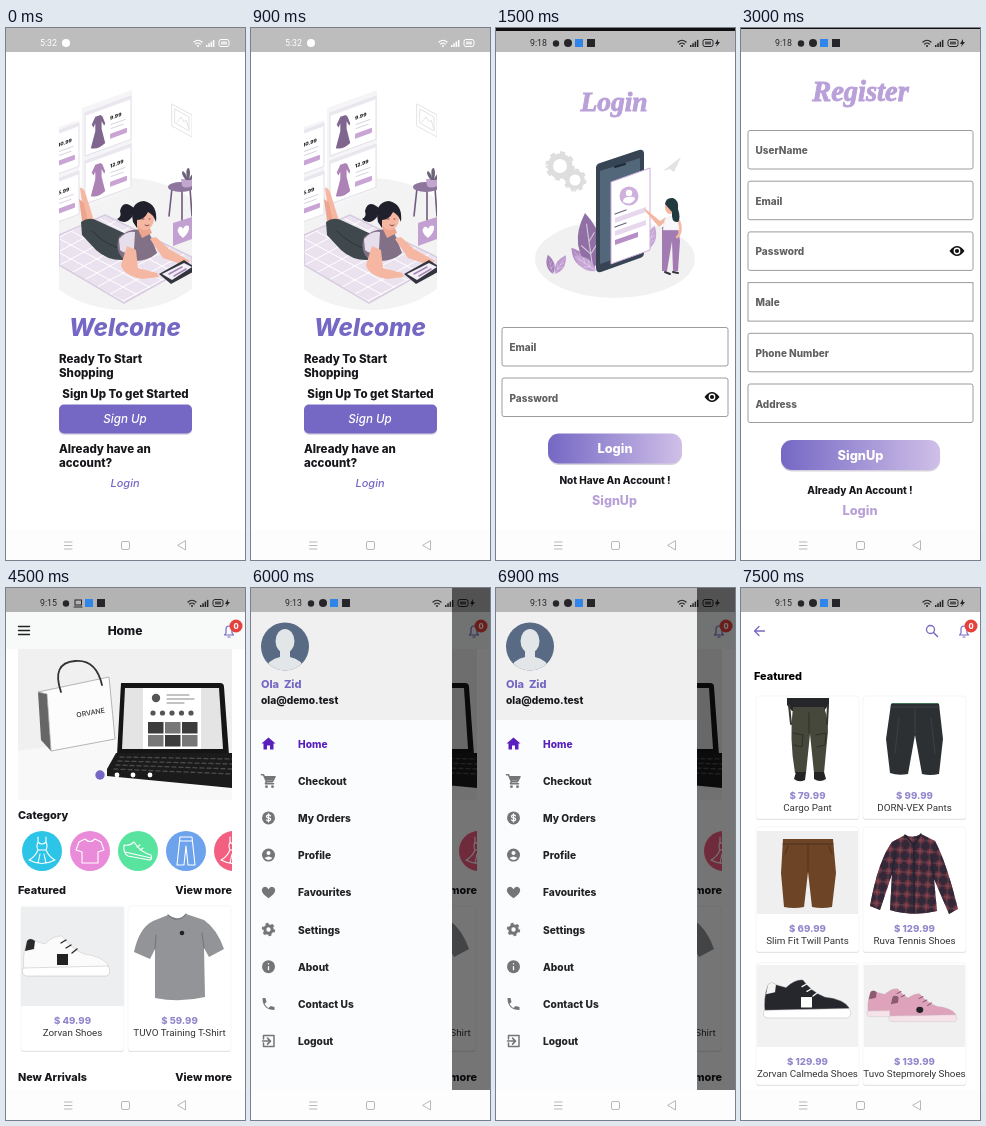
Animation of 239 by 532 pixels, one loop 8 s. Source, as an HTML page:

```html
<!DOCTYPE html>
<html lang="en">
<head>
<meta charset="utf-8">
<title>Shop app tour</title>
<style>
html, body { margin: 0; width: 100%; height: 100%; overflow: hidden; background: #fff; }
svg { display: block; width: 100%; height: 100%; }
text { font-family: Inter, sans-serif; font-weight: 800; white-space: pre; }
.plain { font-family: Roboto, sans-serif; font-weight: 400; }
.script { font-family: "Liberation Serif", serif; font-weight: 700; font-style: italic; stroke: #b9a0d8; stroke-width: .9; }
.italic { font-style: italic; }
.medium { font-weight: 500; }
</style>
</head>
<body>
<svg id="stage" viewBox="0 0 239 532" preserveAspectRatio="none"></svg>
<script>
const PURPLE = '#7568c4', LILAC = '#b9a0d8', INK = '#17171c', GREY = '#757575', SKIN = '#f6b7a2';
const HOLD = 1500, LOOP = 8000;

// Drawing helpers
const rect = (x, y, w, h, fill, extra = '') => `<rect x="${x}" y="${y}" width="${w}" height="${h}" fill="${fill}" ${extra}/>`;
const disc = (x, y, r, fill, extra = '') => `<circle cx="${x}" cy="${y}" r="${r}" fill="${fill}" ${extra}/>`;
const oval = (x, y, rx, ry, fill) => `<ellipse cx="${x}" cy="${y}" rx="${rx}" ry="${ry}" fill="${fill}"/>`;
const path = (d, fill, extra = '') => `<path d="${d}" fill="${fill}" ${extra}/>`;
const line = (d, color, width = 1, extra = '') =>
  `<path d="${d}" fill="none" stroke="${color}" stroke-width="${width}" stroke-linecap="round" stroke-linejoin="round" ${extra}/>`;
const group = (transform, body) => `<g transform="${transform}">${body}</g>`;
const text = (x, y, size, str, fill = INK, cls = '', anchor = 'start') =>
  `<text x="${x}" y="${y}" font-size="${size}" fill="${fill}" class="${cls}" text-anchor="${anchor}">${str}</text>`;
const centered = (x, y, size, str, fill, cls) => text(x, y, size, str, fill, cls, 'middle');

const icons = {
  dress: 'M-4-14V-9Q-6-5-4-1Q-7 6-13 9Q0 16 13 9Q7 6 4-1Q6-5 4-9V-14M-4-9Q0-5 4-9M-4-1H4M-2 3L-4 12M2 3L4 12',
  tee: 'M-5-12L-11-9L-14-1L-8 1V12H8V1L14-1L11-9L5-12Q0-7-5-12Z',
  shoe: 'M-14-6Q-8-5-4-9Q2 1 13 4Q15 9 11 9L-10 5Q-15 2-14-6ZM-13 1L13 7M-1-4L2-6M2-1L5-3',
  pants: 'M-6-14H6L9 14H2L0-5L-2 14H-9ZM-6-10H6'
};

// Phone chrome
function statusBar(clock, { shade = '#bdbdbd', color = '#26262a', strip = 0, first = false, screen = false } = {}) {
  let s = rect(0, 0, 239, 24, shade) + rect(0, 0, 239, strip, '#111');
  s += text(34, 18, 8.8, clock, color, 'plain');
  if (first) s += disc(60, 15, 4, color);
  else s += disc(60, 15.5, 3.2, color)
    + (screen ? rect(69, 12, 6.5, 5, 'none', `stroke="${color}"`) + line('M68 19H76', color) : disc(72, 15, 4, color))
    + rect(79, 11, 8, 8, '#2f86e8') + rect(91, 11, 8, 8, color);
  s += group(`translate(${first ? 6 : 0} 0)`,
    line('M182 14Q186 10.5 190 14M183.7 16Q186 14 188.3 16', color, 1.2) + disc(186, 18, 1, color)
    + [0, 1, 2, 3].map(i => rect(194 + i * 2.3, 17 - i * 1.7, 1.5, 2 + i * 1.7, color)).join('')
    + rect(207, 11.5, 10, 7, 'none', `rx="2" stroke="${color}"`) + rect(209, 13.5, 6, 3, color, 'opacity=".7"')
    + (first ? '' : path('M222 11L219 16H221L220 19L224 14H222Z', color)));
  return s;
}
const navBar = () => rect(0, 502, 239, 30, '#fdfdfd')
  + line('M58.5 514H66M58.5 517.5H66M58.5 521H66', '#b8b8b8')
  + rect(115.5, 513.5, 8, 8, 'none', 'rx="1.5" stroke="#b8b8b8"')
  + line('M179.5 513V522L172 517.5Z', '#b8b8b8');
const bell = () => line('M218.5 47H227.5L226 45V41.5Q226 38 223 38Q220 38 220 41.5V45ZM222 49H224', PURPLE, 1.2)
  + disc(230, 38, 6.5, '#e5423d') + centered(230, 41, 7.5, '0', '#fff');

// Welcome screen
function priceCard(x, y, price, color) {
  return group(`translate(${x} ${y}) skewY(-20)`,
    rect(0, 0, 46, 43, '#fff', 'stroke="#e4dfe8"') + rect(0, 0, 46, 3, '#ebe7ee')
    + group('translate(13 23) scale(.9 1.1)', path('M-3-14L-7-8L-5-5L-3-8L-3-1L-8 13Q0 17 8 13L4-1V-8L7-3L8-5L5-12L3-14Z', color))
    + text(25, 16, 5, price, INK) + line('M26 21H40M26 25H38', '#d8d2dd') + rect(25, 30, 17, 5, '#c9a5d6', 'rx="1"'));
}
function welcome() {
  const rug = 'M53 207L99 187L186 229V237L118 275L53 237Z';
  const art = oval(119, 216, 91, 66, '#f3f3f3')
    + path('M76 80L126 62V161L76 184Z', '#f5f4f6') + path('M53 99L73 92V171L53 184Z', '#f5f4f6')
    + priceCard(79, 85, '9.99', '#80658f') + priceCard(79, 133, '12.99', '#ad83b7')
    + priceCard(27, 112, '10.99', '#9f78ab') + priceCard(27, 160, '5.99', '#80658f')
    + line('M166 76L186 87V109L166 98ZM169 81L183 89V103L169 95ZM171 94L175 89L178 94L180 92L183 101', '#e4e4e4')
    + path(rug, '#eae3ef') + path(rug, 'url(#lattice)') + line(rug, '#d8cce0', 1.5)
    + line('M166 160L163 188M176 162V198M184 160L186 188', '#6f5b7e', 1.6) + oval(175, 159, 13, 5, '#8d759d')
    + path('M175 151H186V158Q180 161 176 158Z', '#c3a6cf')
    + path('M180 152Q174 145 177 143Q180 145 181 150Q179 140 183 140Q185 145 183 151Q187 143 189 147L185 152Z', '#6d6479')
    + path('M167 195L186 189V211L167 218Z', '#c3a0d2')
    + path('M177 210Q169 204 173 199Q176 198 177 201Q179 196 183 198Q184 204 177 210Z', '#fff')
    // Reader on the rug
    + path('M74 160Q78 159 80 167L89 196L82 204Q75 187 76 174Z', SKIN) + path('M73 171L78 175L84 202L77 200Z', '#eda58f')
    + path('M75 194Q83 188 92 193L120 206L118 232Q102 233 90 222L76 207Z', '#3f484c')
    + line('M86 203Q101 218 116 221', '#2d3437')
    + path('M113 209Q126 197 143 204L151 225Q139 236 119 232Q108 224 113 209Z', '#817086')
    + path('M113 211Q121 202 129 204L128 221Q120 228 114 222Z', '#e6dfeb')
    + path('M121 218L115 237Q117 247 136 251L153 249L151 245L132 240L130 222Z', SKIN)
    + path('M144 211L157 230L178 237L184 233L163 221L150 209Z', SKIN)
    + group('translate(3 -3)',
      path('M127 200L140 201L143 208L133 213Z', '#eda58f') + oval(136, 194, 9, 11, SKIN)
      + path('M124 197Q120 177 135 176Q149 179 147 197Q144 189 139 187Q135 195 128 195L128 203Z', '#1f202b')
      + path('M126 184Q114 173 111 186Q113 192 108 194Q116 201 123 192Z', '#1f202b')
      + line('M133 194H135M140 194H141M136 200Q138 202 140 200', '#5c3038', .8))
    + path('M153 246L178 232L187 238V244L165 256Z', '#34343f') + path('M156 246L178 235L186 239L166 252Z', '#f3eff6')
    + line('M163 246L176 239M168 248L180 241', '#a986b9', 1.5);
  return statusBar('5:32', { color: '#fff', first: true })
    + `<g clip-path="url(#artClip)">${art}</g>`
    + centered(119, 308, 24.2, 'Welcome', PURPLE, 'italic')
    + text(53, 335, 11.5, 'Ready To Start') + text(53, 349, 11.5, 'Shopping')
    + centered(119.5, 370, 11.5, 'Sign Up To get Started')
    + rect(53, 378, 133, 29, '#dddae8', 'rx="5"') + rect(53, 376.5, 133, 29, PURPLE, 'rx="5"')
    + centered(119, 395, 11.6, 'Sign Up', '#fff', 'italic medium')
    + text(53, 425, 11.5, 'Already have an') + text(53, 439, 11.5, 'account?')
    + centered(119, 459, 11, 'Login', PURPLE, 'italic medium');
}

// Forms
const field = (x, y, label, radius = 2) => rect(x, y, 232 - x, 38.5, '#fff', `rx="${radius}" stroke="#9c9c9c"`)
  + text(x + 7.5, y + 23.5, 10, label, '#606060');
const eye = y => path(`M208.5 ${y}Q216 ${y - 10} 223.5 ${y}Q216 ${y + 10} 208.5 ${y}Z`, '#111')
  + disc(216, y, 3.4, '#fff') + disc(216, y, 2.1, '#111');
const formButton = (x, y, w, label) => rect(x, y + 1.5, w, 30, '#d5d2dc', 'rx="11"')
  + rect(x, y, w, 30, 'url(#fade)', 'rx="11"') + centered(x + w / 2, y + 19.5, 12.8, label, '#fff');
const gear = (x, y, r) => disc(x, y, r * .7, 'none', `stroke="#dedede" stroke-width="${r * .4}"`)
  + disc(x, y, r * .92, 'none', `stroke="#dedede" stroke-width="${r * .26}" pathLength="16" stroke-dasharray="1"`);
const leaf = (x, y, angle, size, fill) => group(`translate(${x} ${y}) rotate(${angle}) scale(${size})`,
  path('M0 0Q-14-16 0-36Q14-16 0 0Z', fill) + line('M0 0V-29M0-10L5-16M0-10L-5-16M0-18L4-23', '#fff', .7, 'opacity=".6"'));

function login() {
  return statusBar('9:18', { strip: 3 })
    + centered(118, 83, 27.5, 'Login', LILAC, 'script')
    + oval(119, 231, 80, 39, '#f1f1f1') + gear(64, 138, 14) + gear(79, 152, 11)
    + path('M167 143L185 129L178 144L174 141Z', '#e2e2e2')
    + leaf(92, 241, -38, .75, '#b18ac2') + leaf(97, 242, -8, 1.6, '#8f6fa4') + leaf(100, 243, -55, .75, '#c7a6d6')
    + leaf(57, 246, -15, .55, '#a37eb7') + leaf(59, 246, 30, .6, '#c09bd0') + leaf(151, 222, 18, .7, '#c7a6d6')
    + path('M100 140Q100 136 104 135L143 122Q148 121 148 126V225Q148 229 144 230L105 244Q100 245 100 240Z', '#364453')
    + path('M104 143L144 130V222L104 236Z', '#53677a') + line('M119 139L129 136', '#1d2935', 2)
    + path('M115 154L154 140V222L115 236Z', '#fff', 'stroke="#cdaedb"')
    + disc(133, 168, 9.5, '#cfb0dc') + disc(133, 165, 3.2, '#fff') + path('M127 174Q127 169 133 169Q139 168 139 171Q135 178 127 174Z', '#fff')
    + path('M119 190L150 179V184L119 195ZM119 203L150 192V197L119 208Z', '#e7d8ee')
    + path('M119 212L142 204V209L119 217Z', '#b78dc7') + line('M119 186L130 182M119 199L130 195', '#71617c', 1.3)
    + path('M168 195L163 199L150 184L148 180L152 183L164 193L170 189Z', SKIN)
    + path('M166 199H182L184 213L182 243H177L176 213L171 243H166Z', '#a27bb2')
    + path('M169 191Q176 186 183 191L183 202H167Z', '#f8f8fa', 'stroke="#ddd" stroke-width=".5"')
    + line('M183 193Q187 204 181 209', SKIN, 2.5) + oval(174, 179, 5, 7, SKIN)
    + path('M169 176Q170 169 177 170Q183 172 182 181Q185 190 182 194Q175 195 176 184Z', '#203a40')
    + line('M169 244L174 246M177 244L182 245', '#34323d', 2)
    + field(6, 299.5, 'Email') + field(6, 350, 'Password') + eye(369)
    + formButton(52, 405.5, 134, 'Login')
    + centered(119, 456, 10, 'Not Have An Account !') + centered(118.5, 477, 12.5, 'SignUp', LILAC);
}
function register() {
  const labels = ['UserName', 'Email', 'Password', 'Male', 'Phone Number', 'Address'];
  return statusBar('9:18', { strip: 1 })
    + centered(119.5, 73, 28.5, 'Register', LILAC, 'script')
    + labels.map((label, i) => field(7, 102.5 + i * 50.7, label, label === 'Male' ? 0 : 2)).join('') + eye(223)
    + formButton(40, 412, 159, 'SignUp')
    + centered(119, 466, 10, 'Already An Account !') + centered(119, 487, 12.8, 'Login', LILAC);
}

// Shop
const sneaker = (place, body, sole, trim, mark) => group(place,
  path('M7 6Q10 2 15 6L25 9Q34 0 42 1Q50 13 64 19Q82 21 88 30V36H4Q2 20 7 6Z', body, 'stroke="#bbb" stroke-width=".4"')
  + path('M7 6Q10 2 15 6L14 14L5 16Z', trim) + line('M41 8L46 5M46 13L51 10M52 18L57 14', trim, 1.4)
  + path('M3 33L88 31Q92 37 87 41H6Q1 40 3 33Z', sole, 'stroke="#bbb" stroke-width=".5"') + mark);
function card(x, top, bottom, picture, price, name, priceY = bottom - 20.5) {
  const mid = x + 51.5;
  return rect(x, top + 1, 103, bottom - top, '#dedede', 'rx="3"') + rect(x, top, 103, bottom - top, '#fff', 'rx="3" stroke="#f0f0f0" stroke-width=".6"')
    + picture + centered(mid, priceY, 9.6, '$ ' + price, '#9187cc') + centered(mid, priceY + 12, 9.8, name, '#333', 'plain');
}
function banner() {
  const tiles = [0, 1, 2, 3, 4, 5].map(i => rect(142 + i % 3 * 17, 134 + (i > 2) * 13, 15.5, 11.5, i % 2 ? '#777' : '#3c3c3c')).join('');
  return `<g clip-path="url(#bannerClip)">` + rect(12, 61, 214, 151, '#f0f0f0') + path('M12 163L104 150L226 190V212H12Z', '#f8f8f8')
    + path('M32 104L41 106L45 163L35 152Z', '#666') + path('M32 104L103 89L109 151L45 163L41 106Z', '#fcfcfc', 'stroke="#999" stroke-width=".7"')
    + line('M55 104Q45 75 69 73Q90 71 96 97', '#333', 1.8)
    + group('translate(85 127) rotate(-10)', centered(0, 0, 7, 'ORVANE', '#333', 'medium'))
    + path('M115 95H214Q218 95 218 99L223 167H111Z', '#151515') + path('M119 100H213L217 161H116Z', '#e4e4e4')
    + rect(137, 100, 58, 61, '#fff') + disc(150, 110, 4.2, '#555')
    + line('M161 107H183M161 111H188M161 115H178', '#888')
    + [0, 1, 2, 3, 4].map(i => disc(147 + i * 9.5, 125, 2.6, '#555')).join('') + tiles
    + path('M110 165H226V200L101 188V181Z', '#1b1b1b')
    + [0, 1, 2, 3].map(i => line(`M${114 - i * 2} ${169 + i * 4}L226 ${171 + i * 5}`, '#4b4b4b', 1.3, 'stroke-dasharray="4 3"')).join('')
    + disc(94, 187, 4.7, PURPLE) + [111, 127, 144].map(x => disc(x, 187, 2.4, '#fff')).join('') + '</g>';
}
function home(clock = '9:15', screen = true) {
  const categories = [['#2cc5e8', 'dress'], ['#ea8bda', 'tee'], ['#58e49e', 'shoe'], ['#6da2ed', 'pants'], ['#f25f80', 'dress']];
  const shoe = rect(15, 319, 103, 99, '#eceef0')
    + sneaker('translate(14 347)', '#fbfbfb', '#fff', '#2a2a2a', rect(37, 19, 11, 11, '#222'));
  const tee = path('M162 327Q172 334 180 326L198 332Q211 341 218 361L203 369L198 360L199 409Q174 415 149 410L149 361L144 371L128 364Q133 340 147 333Z', '#929497')
    + line('M162 327Q172 336 180 326M150 347L149 361M196 345L198 360', '#777a7d', 1.2) + disc(176, 345, 2.3, '#222');
  return statusBar(clock, { shade: '#b3b3b3', screen }) + rect(0, 24, 239, 37, '#f8f9f9')
    + line('M12.5 38.5H23.5M12.5 42.5H23.5M12.5 46.5H23.5', '#222', 1.4) + centered(119, 47, 12, 'Home') + bell()
    + banner() + text(12, 231, 10.9, 'Category')
    + '<g clip-path="url(#listClip)">' + categories.map(([color, icon], i) =>
      disc(36 + i * 48, 263, 20, color) + group(`translate(${36 + i * 48} 263)`, line(icons[icon], '#fff', 1.1))).join('') + '</g>'
    + text(12, 306, 10.9, 'Featured') + text(226, 306, 10.8, 'View more', INK, '', 'end')
    + card(15, 318, 463, shoe, '49.99', 'Zorvan Shoes', 436)
    + card(122, 318, 463, tee, '59.99', 'TUVO Training T-Shirt', 436)
    + text(12, 493, 10.8, 'New Arrivals') + text(226, 493, 10.8, 'View more', INK, '', 'end');
}
function drawer() {
  const cut = d => line(d, '#fafcfd', 1.3);
  const items = [
    ['Home', c => path('M-7 0L0-6L7 0H5V6H1.5V2H-1.5V6H-5V0Z', c)],
    ['Checkout', c => line('M-7-6H-5L-2 1H4L6.5-4H-4M-2 1L-3 3H5', c, 1.6) + path('M-4-4H6L4 0H-2Z', c) + disc(-2, 6, 1.4, c) + disc(4, 6, 1.4, c)],
    ['My Orders', c => disc(0, 0, 6.5, c) + cut('M2-2Q0-4-2-2Q-2 0 0 0Q2.5 0 2 2Q0 4-2 2M0-4V4')],
    ['Profile', c => disc(0, 0, 6.5, c) + disc(0, -2, 2, '#fafcfd') + path('M-4 3Q0 0 4 3Q0 7-4 3Z', '#fafcfd')],
    ['Favourites', c => path('M0 6Q-10-1-5-5Q-2-7 0-3Q2-7 5-5Q10-1 0 6Z', c)],
    ['Settings', c => disc(0, 0, 3.7, 'none', `stroke="${c}" stroke-width="3"`) + disc(0, 0, 5.7, 'none', `stroke="${c}" stroke-width="2" pathLength="12" stroke-dasharray="1"`)],
    ['About', c => disc(0, 0, 6.5, c) + cut('M0 0V3M0-3V-2.8')],
    ['Contact Us', c => path('M-6-6H-3L-2-2L-4 0Q-2 3 0 4L2 2L6 3V6Q-6 6-6-6Z', c)],
    ['Logout', c => line('M-5-2V-5.5H5.5V5.5H-5V2M-6 0H2M-1-3L2 0L-1 3', c, 1.5)]
  ];
  return home('9:13', false) + rect(0, 0, 239, 502, '#000', 'opacity=".54"')
    + '<g clip-path="url(#drawerClip)">' + rect(0, 0, 201, 502, '#fafcfd') + statusBar('9:13', { shade: '#b8b8b8' })
    + rect(0, 24, 201, 108, '#f0f0f0') + '</g>'
    + disc(34, 58.5, 24, '#596a85') + '<g clip-path="url(#avatarClip)">' + oval(34, 53, 9.5, 12, '#e2e6e9')
    + path('M29 61H39V69Q51 71 54 83H14Q17 71 29 69Z', '#e2e6e9') + '</g>'
    + text(10, 100, 11, 'Ola  Zid', PURPLE) + text(10, 116, 10.2, 'ola@demo.test')
    + items.map(([label, icon], i) => {
      const y = 155.5 + i * 37.2, color = i ? '#222' : '#5a20bd';
      return group(`translate(17.5 ${y})`, icon(i ? GREY : color)) + text(47, y + 4, 10.2, label, color);
    }).join('');
}
function featured() {
  const cargo = path('M46 110H88V116L83 123H51L46 117Z', '#24262a')
    + path('M52 119H83Q89 135 86 153L83 185H73L69 146L65 185H54Q48 150 52 119Z', '#45483a')
    + line('M68 125V145M52 145L62 147L61 159L53 157M75 147L85 145L84 157L76 159', '#2d3026')
    + line('M48 117L50 136M87 117L86 136', '#34352f', 2)
    + path('M55 184H65L64 192Q58 195 53 191ZM73 184H83L85 191Q79 195 73 191Z', '#242424');
  const hiking = path('M150 116H198L202 151L198 186Q189 188 181 186L174 147L167 186Q157 188 149 185L145 151Z', '#2d3033')
    + line('M150 119H198M174 119V145M158 130L154 165M190 130L194 165', '#3c4044') + line('M151 115.5H197', '#3f7454', 1.2);
  const twill = rect(16, 243, 101, 83, '#efefef')
    + path('M42 251H92L95 285L91 319Q81 321 71 319L67 284L63 319Q53 321 43 319L40 285Z', '#6d4425')
    + line('M42 256H92M67 256V283M47 258L44 266M88 258L91 266', '#51301a');
  const body = 'M164 247Q172 251 180 246L194 253Q205 273 217 321L208 326L193 291L196 323Q172 329 149 322L151 286L139 322L129 318Q137 273 151 254Z';
  const shirt = path(body, '#642c38') + path(body, 'url(#plaid)') + line('M164 247L173 257L180 246M173 257V324M151 286L154 265M193 291L190 266', '#202431', 1.4);
  const black = rect(16, 377, 101, 82, '#f2f2f2') + sneaker('translate(20 391) scale(1 .95)', '#25272d', '#fff', '#f4f4f4', rect(40, 19, 11, 11, '#fff'));
  const pink = rect(123, 377, 101, 82, '#f0f0f1')
    + [[124, 400], [146, 405]].map(([x, y]) => sneaker(`translate(${x} ${y}) scale(.78 .7)`, '#dfa2bb', '#f6e2e9', '#8d5a70', disc(42, 24, 4.5, '#25222a'))).join('');
  return statusBar('9:15', { shade: '#b8b8b8' })
    + line('M23.5 43H14M18 38.5L13.5 43L18 47.5', PURPLE, 1.3)
    + disc(189.5, 41.5, 4, 'none', `stroke="${PURPLE}" stroke-width="1.3"`) + line('M192.5 44.5L196.5 48.5', PURPLE, 1.5) + bell()
    + text(13, 92, 10.9, 'Featured', '#000')
    + card(15, 108, 231, cargo, '79.99', 'Cargo Pant') + card(122, 108, 231, hiking, '99.99', 'DORN-VEX Pants')
    + card(15, 239, 364, twill, '69.99', 'Slim Fit Twill Pants') + card(122, 239, 364, shirt, '129.99', 'Ruva Tennis Shoes')
    + card(15, 375, 497, black, '129.99', 'Zorvan Calmeda Shoes') + card(122, 375, 497, pink, '139.99', 'Tuvo Stepmorely Shoes');
}

const defs = `<defs>
  <linearGradient id="fade"><stop stop-color="#7568c4"/><stop offset="1" stop-color="#cfbfe8"/></linearGradient>
  <pattern id="lattice" width="26" height="14" patternUnits="userSpaceOnUse"><path d="M0 0L26 14M0 14L26 0" stroke="#fff" fill="none"/></pattern>
  <pattern id="plaid" width="10" height="11" patternUnits="userSpaceOnUse" patternTransform="rotate(4)"><path d="M0 0H10V5H0ZM0 0H4V11H0Z" fill="#202638" opacity=".72"/><path d="M7 0V11M0 8H10" stroke="#a06b73" stroke-width=".5"/></pattern>
  <clipPath id="artClip">${rect(53, 58, 133, 226, '#000')}</clipPath>
  <clipPath id="bannerClip">${rect(12, 61, 214, 151, '#000')}</clipPath>
  <clipPath id="listClip">${rect(12, 240, 214, 46, '#000')}</clipPath>
  <clipPath id="drawerClip">${rect(0, 0, 201, 502, '#000')}</clipPath>
  <clipPath id="avatarClip">${disc(34, 58.5, 24, '#000')}</clipPath>
</defs>`;
const stage = document.getElementById('stage');
stage.innerHTML = defs + [welcome, login, register, home, drawer, featured]
  .map(screen => `<g class="screen" display="none">${rect(0, 0, 239, 532, '#fff')}${screen()}${navBar()}</g>`).join('');
const screens = [...stage.querySelectorAll('.screen')];
const start = performance.now();

function render() {
  const time = (performance.now() - start) % LOOP;
  const current = Math.floor(time / HOLD);
  screens.forEach((screen, i) => screen.setAttribute('display', i === current ? 'inline' : 'none'));
  requestAnimationFrame(render);
}
render();
</script>
</body>
</html>
```
